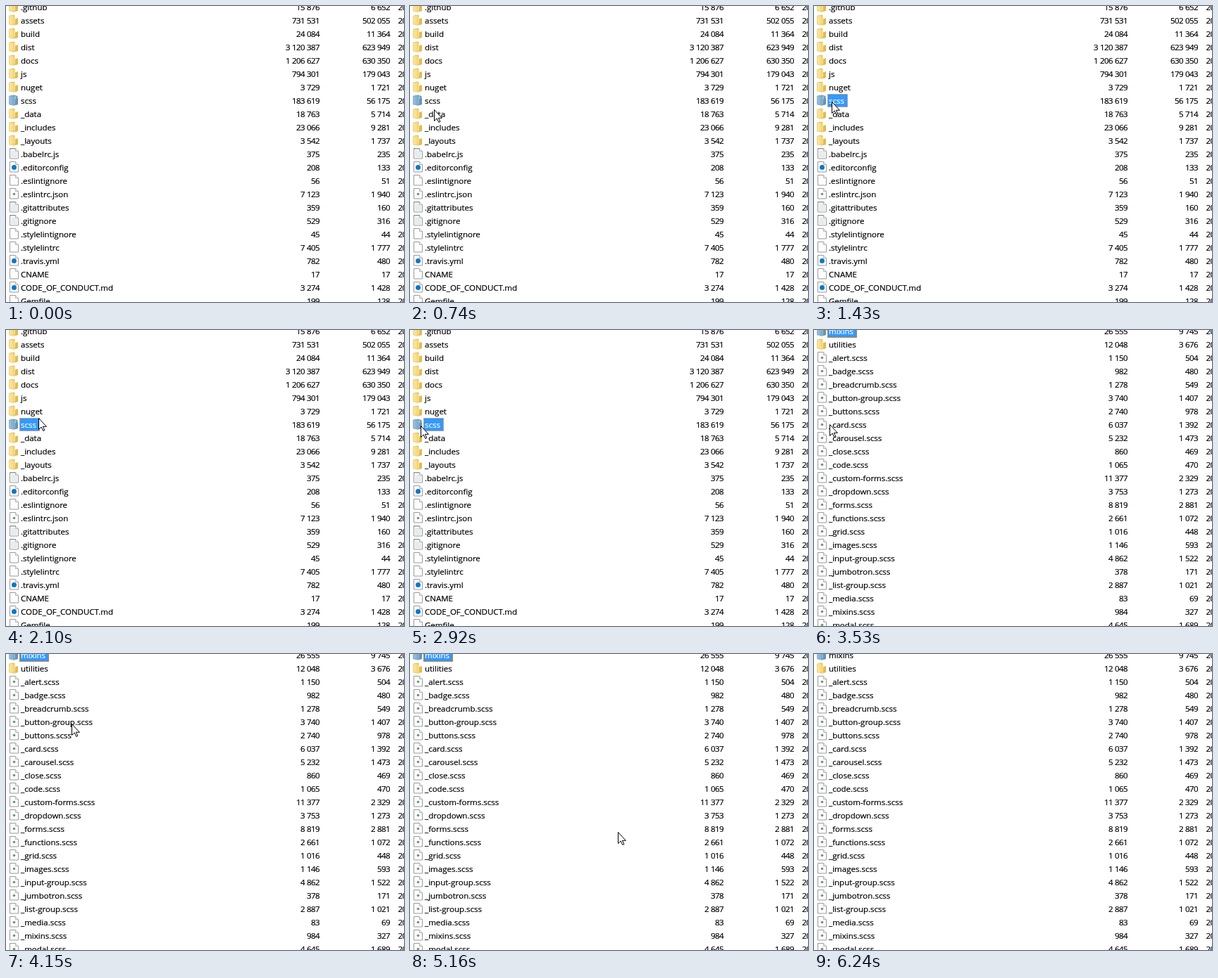
Recreate the animation shown at these times as an HTML page. Size 565x421 px, loop 6300 ms.

```html
<!DOCTYPE html>
<html lang="en">
<head>
<meta charset="utf-8">
<title>File list</title>
<style>
  html, body { margin: 0; width: 100%; height: 100%; overflow: hidden; background: #fff; }
  svg { display: block; }
  text {
    font: 11.5px "Open Sans", "Noto Sans", sans-serif; white-space: pre;
    fill: currentColor; stroke: currentColor; stroke-width: .2px; color: #000;
  }
  .number { letter-spacing: -.58px; word-spacing: .6px; }
  .size { text-anchor: end; }
  .mark { fill: #39f; stroke: #d07a2c; visibility: hidden; }
  .selected .mark { visibility: visible; }
  .selected .name { color: #fff; }
</style>
</head>
<body>
<svg id="stage" width="565" height="421" viewBox="0 0 565 421">
  <defs>
    <linearGradient id="yellow"><stop stop-color="#fbe7a0"/><stop offset="1" stop-color="#f3d676"/></linearGradient>
    <linearGradient id="blue"><stop stop-color="#9cc0d8"/><stop offset="1" stop-color="#7ba9c9"/></linearGradient>
    <g id="folder">
      <path d="M3 1.5 8 .5l2 1.5v12L8 15z" fill="#e3bd55"/>
      <path d="M8.5 2.5h2.5V13H8.5z" fill="#fff8dc"/>
      <path d="M10 6.5 14 5v9l-4 1.2z" fill="#e2bb4c"/>
      <path d="M1.5 2 7.5 1.5 9 4v11.5l-7.5-1.5z" fill="url(#yellow)" stroke="#e3c467" stroke-width=".7"/>
    </g>
    <g id="picked">
      <path d="M3 1.5 8 .5 13.5 2v12L8 15z" fill="#6e9fc0"/>
      <path d="M8.5 2.5h2.5V13H8.5z" fill="#a9c9de"/>
      <path d="M10 6.5 14 5v9l-4 1.2z" fill="#6496ba"/>
      <path d="M1.5 2 7.5 1.5 9 4v11.5l-7.5-1.5z" fill="url(#blue)" stroke="#74a4c4" stroke-width=".7"/>
    </g>
    <g id="page">
      <path d="M2.5.5h8l4 4v10.5h-12z" fill="#fdfdfd" stroke="#9a9a9a"/>
      <path d="M10.5.5v4h4" fill="#eee" stroke="#b4b4b4"/>
    </g>
    <g id="lined">
      <use href="#page"/>
      <path d="M4 4.5h6M4 6.5h9M4 8.5h9M4 10.5h9M4 12.5h9" stroke="#d3dcdd"/>
      <path d="M3 1.5h8" stroke="#8d9999" stroke-dasharray="1 1"/>
    </g>
    <g id="code"><use href="#page"/><circle cx="8.5" cy="8.5" r="3.5" fill="#0a78c6"/></g>
    <g id="style"><use href="#page"/><circle cx="8.5" cy="8.5" r="1.8" fill="#6c9a72"/></g>
  </defs>
  <g id="root"></g>
  <g id="inner"></g>
  <path id="cursor" d="M.5.5v16l3.7-3.5 2.6 5.5 2.1-1-2.5-5.2h5z" fill="#fff" stroke="#000"/>
</svg>
<script>
const LOOP = 6300, ROW = 19;
const OPEN = 3070, SELECT = 1430, DESELECT = 6240, ENTER = 200, LEAVE = 5310;

const rootRows = `folder|.github|15 876|6 652
folder|assets|731 531|502 055
folder|build|24 084|11 364
folder|dist|3 120 387|623 949
folder|docs|1 206 627|630 350
folder|js|794 301|179 043
folder|nuget|3 729|1 721
picked|scss|183 619|56 175
folder|_data|18 763|5 714
folder|_includes|23 066|9 281
folder|_layouts|3 542|1 737
lined|.babelrc.js|375|235
code|.editorconfig|208|133
page|.eslintignore|56|51
style|.eslintrc.json|7 123|1 940
lined|.gitattributes|359|160
lined|.gitignore|529|316
page|.stylelintignore|45|44
page|.stylelintrc|7 405|1 777
code|.travis.yml|782|480
page|CNAME|17|17
code|CODE_OF_CONDUCT.md|3 274|1 428
page|Gemfile|199|128`;

const innerRows = `picked|mixins|26 555|9 745
folder|utilities|12 048|3 676
` + `alert|1 150|504
badge|982|480
breadcrumb|1 278|549
button-group|3 740|1 407
buttons|2 740|978
card|6 037|1 392
carousel|5 232|1 473
close|860|469
code|1 065|470
custom-forms|11 377|2 329
dropdown|3 753|1 273
forms|8 819|2 881
functions|2 661|1 072
grid|1 016|448
images|1 146|593
input-group|4 862|1 522
jumbotron|378|171
list-group|2 887|1 021
media|83|69
mixins|984|327
modal|4 645|1 689`.replace(/^[^|]+/gm, 'style|_$&.scss');

function listMarkup(rows, markWidth, markDash) {
  return rows.split('\n').map((row, i) => {
    const [icon, name, size, packed] = row.split('|');
    const y = 6 + i * ROW;
    const picked = icon === 'picked';
    const mark = `<rect class="mark" x="19.5" y="${y - 13.5}" width="${markWidth}"
      height="${ROW - 1}" stroke-dasharray="${markDash}"/>`;
    return `<use href="#${icon}" x="3" y="${y - 13}"/>
      ${picked ? mark : ''}
      <text class="${picked ? 'name' : ''}" x="21" y="${y}">${name}</text>
      <text class="number size" x="445" y="${y}">${size}</text>
      <text class="number size" x="545" y="${y}">${packed}</text>
      <text class="number" x="556.5" y="${y}">20</text>`;
  }).join('');
}

const [root, inner, cursor] = ['root', 'inner', 'cursor'].map(id => document.getElementById(id));
root.innerHTML = listMarkup(rootRows, 28, '1 1');
inner.innerHTML = listMarkup(innerRows, 41, 'none');

// Each move: start, end, steps, curve control point, end point
const origin = [509, 395];
const moves = [
  [200, 790, 14, [46, 156], [29, 144]],
  [840, 970, 4, [27, 139], [25, 136]],
  [1760, 2100, 6, [2, 130], [46, 125]],
  [2460, 2920, 9, [34, 133], [15, 136]],
  [3530, 3720, 5, [30, 136], [72, 96]],
  [3950, 4150, 5, [80, 75], [93, 99]],
  [5030, 5310, 7, [160, 140], [610, 509]]
];

function cursorAt(time) {
  let from = origin;
  for (const [start, end, steps, control, to] of moves) {
    if (time < start) break;
    if (time < end) {
      // The slack absorbs steps that fall on whole hundredths of a second
      const step = Math.floor((time - start) / (end - start) * (steps - 1) + .2);
      const p = (step + 1) / steps, q = 1 - p;
      return from.map((v, i) => Math.round(q * q * v + 2 * p * q * control[i] + p * p * to[i]));
    }
    from = to;
  }
  return from;
}

function show(element, visible) {
  element.style.display = visible ? '' : 'none';
}

function draw(now) {
  const time = now % LOOP;
  show(root, time < OPEN);
  show(inner, time >= OPEN);
  root.classList.toggle('selected', time >= SELECT);
  inner.classList.toggle('selected', time < DESELECT);
  show(cursor, time >= ENTER && time < LEAVE);
  cursor.setAttribute('transform', `translate(${cursorAt(time)})`);
}

const began = performance.now();
function tick() {
  draw(performance.now() - began);
  requestAnimationFrame(tick);
}
tick();
</script>
</body>
</html>
```
